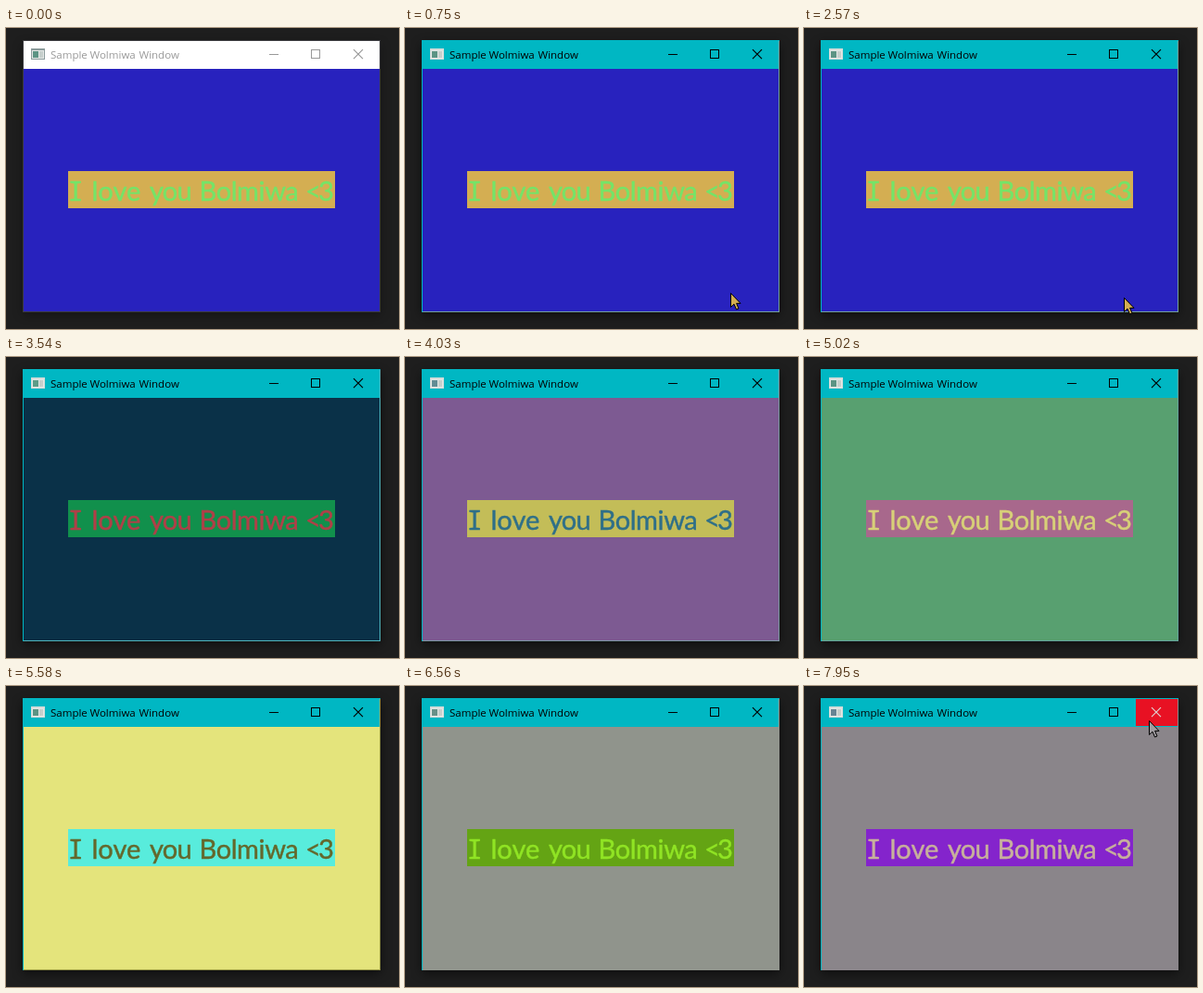
Recreate the animation shown at these times as an HTML page. Size 424 by 324 pixels, loop 8 s.

```html
<!DOCTYPE html>
<html lang="en">
<head>
<meta charset="utf-8">
<title>Sample window</title>
<style>
  html, body { margin: 0; width: 100%; height: 100%; overflow: hidden; background: #1e1e1e; }
  svg { display: block; }
  .title { font: 11.5px "Open Sans", "Noto Sans", sans-serif; }
  .message { font: 29px Lato, "Open Sans", sans-serif; stroke-width: .45; }
  .serif-i { font-family: "Noto Sans Mono", "DejaVu Sans Mono", monospace; }
</style>
</head>
<body>
<svg width="424" height="324" viewBox="0 0 424 324">
  <defs>
    <filter id="blur" x="-20%" y="-20%" width="140%" height="140%">
      <feGaussianBlur stdDeviation="6"/>
    </filter>
  </defs>
  <rect width="424" height="324" fill="#1e1e1e"/>
  <rect id="shadow" x="18" y="17" width="386" height="292" fill="#000" filter="url(#blur)"/>
  <rect id="edge" x="18" y="13" width="386" height="293"/>
  <rect id="leftEdge" x="18" y="13" width="1" height="293"/>
  <rect id="bar" x="19" y="14" width="384" height="30"/>
  <rect id="topEdge" x="18" y="13" width="386" height="1"/>
  <rect id="client" x="19" y="44" width="384" height="261"/>

  <g shape-rendering="crispEdges">
    <rect id="iconFrame" x="27" y="22" width="15" height="12"/>
    <rect x="28" y="24" width="13" height="9" fill="#e4e8e6"/>
    <rect id="iconPane" x="29" y="25" width="6" height="7"/>
    <rect x="36" y="25" width="4" height="7" fill="#c6cfcc"/>
  </g>
  <text id="title" class="title" y="33"><tspan x="48">Sample</tspan> <tspan x="90.5">Wolmiwa</tspan> <tspan x="143.5">Window</tspan></text>

  <rect id="closeHover" x="358" y="14" width="45" height="29" fill="#e81123"/>
  <g id="buttons" fill="none">
    <path d="M284 28.5H294M329.5 23.5H338.5V32.5H329.5Z" shape-rendering="crispEdges"/>
    <path id="cross" d="M375 23.2L385 33.2M385 23.2L375 33.2" stroke-width="1.2"/>
  </g>

  <rect id="label" x="67" y="154" width="288" height="40"/>
  <text id="message" class="message" y="186"><tspan class="serif-i" x="66.5">I</tspan> <tspan x="92.5">love</tspan> <tspan x="155" letter-spacing="-.8">you</tspan> <tspan x="208.5" letter-spacing="-.4">Bolmiwa</tspan> <tspan x="323 337">&lt;3</tspan></text>

  <path id="cursor" d="M.5 .5V15.5L4 12.2L6.5 18L9 17L6.6 11.4H11Z" stroke="#000" stroke-linejoin="round"/>
</svg>
<script>
const $ = id => document.getElementById(id);
const LOOP = 8000, CYAN = '#00b7c3';

// start, client, label, message, right/bottom edge, icon pane
const themes = [
  [0, '#2822be', '#d4ae52', '#74e468', '#73a09c', '#5c9484'],
  [3540, '#0a3148', '#11904c', '#b04048', '#4fb4bc', '#5c9c88'],
  [4030, '#7d5a92', '#c3bd58', '#2f6f88', '#7d98a4', '#628c94'],
  [4520, '#9bc0e8', '#ce5018', '#9868c4', '#69a6b4', '#5878b8'],
  [5020, '#58a070', '#a8688c', '#d8d078', '#64a49c', '#5c9484'],
  [5580, '#e4e47c', '#58ecdc', '#64682c', '#9c9c48', '#5c9484'],
  [6070, '#a86c58', '#3c58a4', '#c4dc90', '#90847c', '#648c8c'],
  [6560, '#90948c', '#64a414', '#90e424', '#90948c', '#689088'],
  [7050, '#90948c', '#8424cc', '#c8b09c', '#90948c', '#689088'],
  [7540, '#8a858a', '#8424cc', '#c8b09c', '#8a858a', '#688494']
];

// pointer tip: time, x, y; no position means hidden
const moves = [
  [0], [200, 354, 303], [270, 353, 294], [340, 351, 287],
  [750, 351, 285], [2570, 345, 290], [2650, 373, 298], [2720]
];
const START = 7470, STEP = 68.5, STEPS = 7;
for (let i = 0; i <= STEPS; i++) {
  const left = 1 - i / STEPS;
  moves.push([START + i * STEP, 372 + 14 * left * left, 37 + 213 * left ** 1.7]);
}

const at = (list, t) => list.findLast(item => item[0] <= t);
const paint = (id, color, attr = 'fill') => $(id).setAttribute(attr, color);

function draw(t) {
  const active = t >= 480;
  const [, client, label, message, edge, pane] = at(themes, t);
  const [, x, y] = at(moves, t);
  const hover = x >= 358 && y < 44;

  paint('shadow', active ? .55 : .32, 'opacity');
  paint('edge', active ? edge : '#3c3c40');
  paint('leftEdge', active ? CYAN : '#3c3c40');
  paint('topEdge', active ? CYAN : '#3c3c40');
  paint('bar', active ? CYAN : '#fff');
  paint('title', active ? '#000' : '#999');
  paint('buttons', active ? '#000' : '#999', 'stroke');
  paint('cross', hover ? '#e0d0d0' : active ? '#000' : '#999', 'stroke');
  paint('closeHover', hover ? 'visible' : 'hidden', 'visibility');
  paint('iconFrame', active ? '#d4dcda' : '#8c9c9c');
  paint('iconPane', pane);
  paint('client', client);
  paint('label', label);
  paint('message', message);
  paint('message', message, 'stroke');

  paint('cursor', x === undefined ? 'hidden' : 'visible', 'visibility');
  if (x !== undefined) {
    paint('cursor', `translate(${Math.round(x)} ${Math.round(y)})`, 'transform');
    paint('cursor', t < START ? '#d4ae52' : '#a09ca0');
  }
}

const begin = performance.now();
function frame() {
  draw((performance.now() - begin) % LOOP);
  requestAnimationFrame(frame);
}
frame();
</script>
</body>
</html>
```
